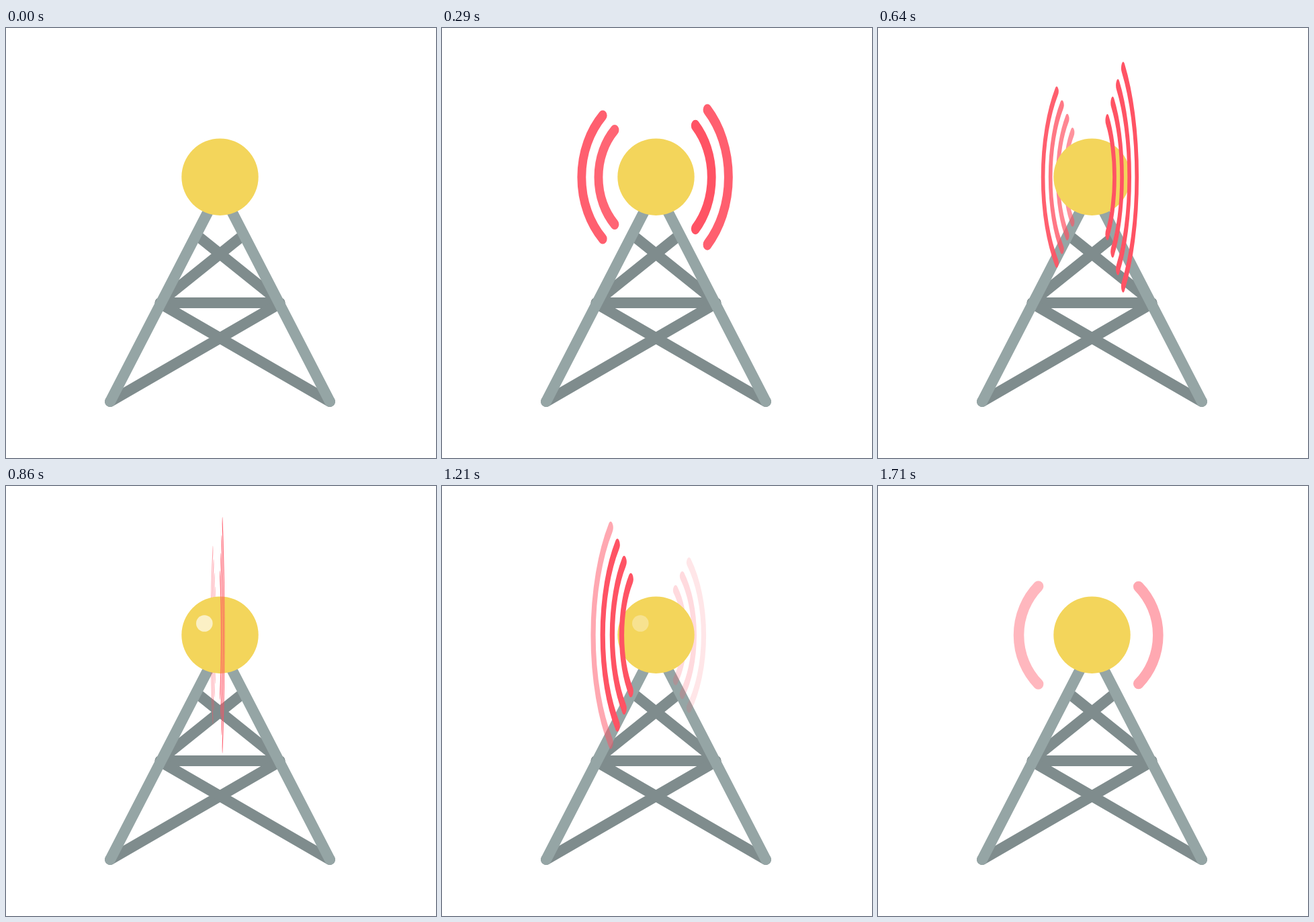
Write an HTML page with a canvas that moves like this. It is 640 px wide and 640 px high and loops after 1780 ms.

```html
<!DOCTYPE html>
<html lang="en">
<head>
<meta charset="utf-8">
<title>Radio tower</title>
<style>
  html, body { margin: 0; height: 100%; overflow: hidden; background: #fff; }
  canvas { display: block; width: 100vw; height: 100vh; }
</style>
</head>
<body>
<canvas id="stage" width="640" height="640"></canvas>
<script>
const ctx = document.getElementById('stage').getContext('2d');
const LOOP = 1780, STEPS = 25;
const MID_X = 318.5, WAVE_X = 315, WAVE_Y = 222;
const RED = '#ff5364', DARK = '#7f8c8d', LIGHT = '#95a5a5', YELLOW = '#f3d55b';
const clamp = v => Math.max(0, Math.min(1, v));

function line(color, x1, y1, x2, y2) {
  ctx.strokeStyle = color;
  ctx.beginPath();
  ctx.moveTo(x1, y1);
  ctx.lineTo(x2, y2);
  ctx.stroke();
}

function mirrored(color, x1, y1, x2, y2) {
  line(color, x1, y1, x2, y2);
  line(color, 2 * MID_X - x1, y1, 2 * MID_X - x2, y2);
}

function disc(color, x, y, r) {
  ctx.fillStyle = color;
  ctx.beginPath();
  ctx.arc(x, y, r, 0, 2 * Math.PI);
  ctx.fill();
}

function tower() {
  mirrored(DARK, 284, 308.5, 403, 404);
  line(DARK, 229.5, 409, 407.5, 409);
  mirrored(DARK, 155, 556, 407.5, 410);
  mirrored(LIGHT, 155, 556, 318, 240);
}

// Four concentric arcs, squeezed sideways as the antenna turns
function waves(x, scaleX, scaleY, alpha) {
  ctx.strokeStyle = RED;
  for (let k = 0; k < 4; k++) {
    ctx.save();
    ctx.globalAlpha = alpha(k);
    ctx.translate(x, WAVE_Y);
    ctx.scale(scaleX, scaleY);
    ctx.beginPath();
    ctx.arc(0, 0, 102.2 + 31.3 * k, -Math.PI / 4, Math.PI / 4);
    ctx.stroke();
    ctx.restore();
  }
}

function draw(step) {
  const u = step - 12.5;
  const turn = (5.85 * u + 0.006 * u ** 3) * Math.PI / 180;
  const side = -Math.sin(turn) , width = Math.cos(Math.PI / 2 - Math.abs(turn)) * Math.sign(side);
  const depth = Math.cos(turn) ** 2.3;

  const rise = k => clamp((step - 2.15 * k) / 2);
  const nearAlpha = k => Math.min(rise(k), clamp((24.84 - 2.28 * k - step) / 2));
  const farAlpha = k => {
    const start = 2 + 2.15 * k, end = 21 - 0.55 * k * k;
    return Math.min(rise(k), clamp((end - step) / (end - start)));
  };
  const returnAlpha = k => k ? 0 : clamp((step - 21) / 6);

  ctx.clearRect(0, 0, 640, 640);
  ctx.lineWidth = 16;
  ctx.lineCap = 'round';
  tower();
  waves(WAVE_X, -width, 1 - 0.093 * depth, farAlpha);
  waves(WAVE_X + 2.5, -width, 1, returnAlpha);
  disc(YELLOW, MID_X, 221.7, 57.2);
  ctx.globalAlpha = 0.65 * clamp((4.5 - Math.abs(step - 13.5)) / 2);
  disc('#fff', 295.3, 204.5, 12.3);
  ctx.globalAlpha = 1;
  waves(WAVE_X + 6.5 * side * Math.abs(side), width, 1 + 0.2 * depth, nearAlpha);
}

function tick() {
  const t = performance.now() % LOOP;
  draw(Math.floor(t / LOOP * STEPS + 0.1) % STEPS);
  requestAnimationFrame(tick);
}
tick();
</script>
</body>
</html>
```
